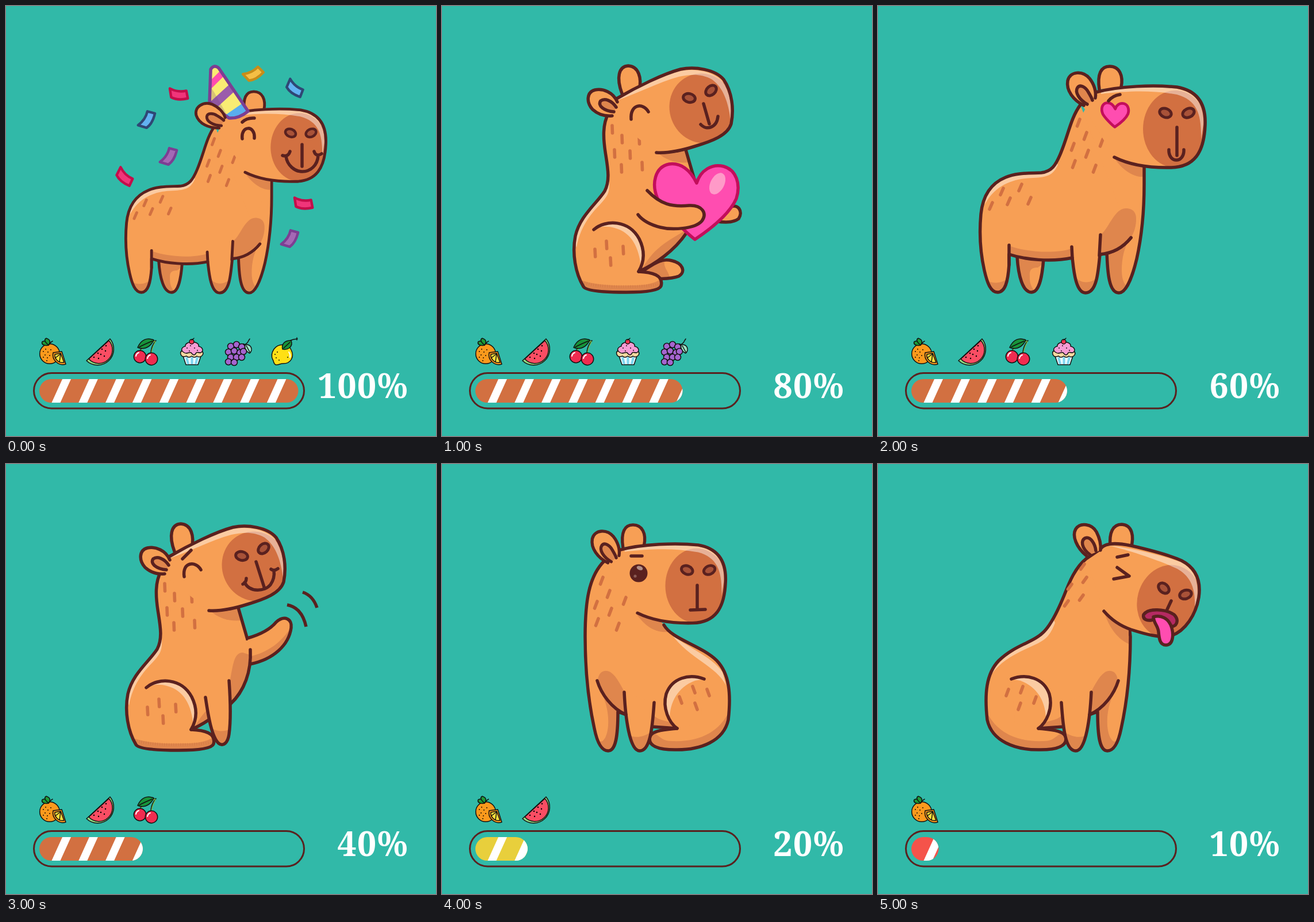
Animation, 748 px wide and 748 px high, one loop 6 s. Source, as an HTML page:

```html
<!DOCTYPE html>
<html lang="en">
<head>
<meta charset="utf-8">
<title>Capybara battery</title>
<style>
  html, body { margin: 0; width: 100%; height: 100%; overflow: hidden; background: #31b9a8; }
  svg { display: block; width: 100vw; height: 100vh; }
  .ln { fill: none; stroke: #5a211f; stroke-width: 5.5; stroke-linecap: round; stroke-linejoin: round; }
  .fur { fill: none; stroke: #d27041; stroke-width: 5.6; stroke-linecap: round; }
  .shade { fill: #df864d; }
  .shine { fill: #fff; opacity: .45; }
  .fruit { stroke: #111; stroke-width: 1.5; stroke-linecap: round; stroke-linejoin: round; }
  text { font: 600 59px "Noto Serif", serif; letter-spacing: 1.5px; fill: #fff; text-anchor: end; }
</style>
</head>
<body>
<svg id="stage" viewBox="0 0 748 748" xmlns="http://www.w3.org/2000/svg"></svg>
<script>
const BODY = '#f79f55', SHADE = '#df864d', MUZZLE = '#d27041', DARK = '#5a211f';
const PINK = '#ff4db0', ROSE = '#c30e5b';
let clips = 0;

const path = (d, attrs) => `<path d="${d}" ${attrs}/>`;
const line = d => path(d, 'class="ln"');
const shade = d => path(d, 'class="shade"');
const shine = d => path(d, 'class="shine"');
const move = (x, y, s, inner) => `<g transform="translate(${x} ${y}) scale(${s})">${inner}</g>`;
const oval = (x, y, rx, ry, turn, attrs) =>
  `<ellipse rx="${rx}" ry="${ry}" transform="translate(${x} ${y}) rotate(${turn})" ${attrs}/>`;
const dot = (x, y, r, attrs = '') => `<circle cx="${x}" cy="${y}" r="${r}" ${attrs}/>`;

// Filled shape with its details clipped inside and its outline on top.
function part(d, inner = '', fill = BODY, edge = DARK) {
  const id = 'c' + clips++;
  return `<clipPath id="${id}">${path(d, '')}</clipPath>` + path(d, `fill="${fill}"`) +
    `<g clip-path="url(#${id})">${inner}</g>` + path(d, `class="ln" style="stroke:${edge}"`);
}
const fur = (spots, dx, dy) => path(spots.map(([x, y]) => `M${x},${y}l${dx},${dy}`).join(''), 'class="fur"');
const nostril = (x, y, turn) =>
  oval(x, y, 10.5, 7.5, turn, `fill="#a85238" stroke="${DARK}" stroke-width="5"`);
const muzzle = (x, y, rx, ry, turn = 0) => oval(x, y, rx, ry, turn, `fill="${MUZZLE}"`);
const ear = (outer, inner) => part(outer) + path(inner, `fill="${SHADE}"`) + line(inner);

const neckFur = fur([[351,197],[363,220],[341,239],[391,232],[366,251],[343,269],[379,277]], -4.5, 12);

// Level head, shared by the standing and the calm seated pose; a hat pushes the ears apart.
const levelHead = ({ hat = '', tilt = 0, spread = 0 } = {}) =>
  move(spread, 0, 1, part('M385,145C381,118 388,105 403,105C420,105 427,121 423,141')) +
  part('M354,170L379,150C420,139 480,137 520,141C555,147 571,170 569,208C567,255 550,280 510,281C470,282 435,275 411,263',
    muzzle(517, 214, 56, 67) +
    shine('M388,149C440,140 490,139 520,144C550,149 568,170 566,206L562,232C563,190 556,164 520,154C480,147 440,147 388,153Z')) +
  hat + `<g transform="rotate(${tilt} 366 170)">` +
  ear('M358,173C340,164 327,147 330,130C334,113 356,112 368,126C376,136 380,149 378,160',
    'M364,171C350,163 342,150 347,142C352,135 362,142 366,150C369,155 372,160 373,164') + '</g>' +
  nostril(500, 186, 22) + nostril(540, 186, -25);

const standing = head =>
  path('M360,180L461,278V330L452,404L386,432L300,300Z', `fill="${BODY}"`) +
  part('M242,436C244,470 252,498 267,498C282,498 286,465 288,440',
    shade('M240,430H290V446L278,455C262,455 264,464 264,474C264,486 270,492 274,500H240Z')) +
  part('M398,425C399,465 402,499 419,499C433,499 444,465 450,440C460,395 463,350 463,310V276',
    shade('M396,420L440,402C428,418 424,440 424,460C424,478 430,488 438,492L420,502H396Z') +
    shade('M410,263C425,286 445,298 465,297V270Z')) +
  part('M352,172C335,195 331,225 317,258C309,277 302,288 284,290C262,291 240,290 222,298C195,309 182,332 179,362C176,395 177,425 185,460C190,482 196,498 208,498C221,498 226,480 228,450V432C255,441 300,446 338,438C340,455 343,499 361,499C380,499 383,465 386,432C410,430 428,418 440,403',
    shade('M228,417C260,429 310,431 337,422V446H228Z') +
    shade('M180,470C195,486 215,484 228,472V502H180Z') +
    shade('M338,466C352,486 372,484 386,468V502H338Z') +
    shine('M186,345C190,318 210,297 245,293L296,289C302,286 307,280 310,273L313,276C305,294 295,298 270,299C232,300 203,313 186,345Z')) +
  shade('M387,397C400,392 410,352 431,352C446,352 450,362 449,374C448,388 444,396 440,403C425,420 405,430 386,432Z') +
  shade('M410,263C425,286 445,298 460,297V278Z') +
  line('M228,416V450M337,419L338,438M386,432C410,430 428,418 440,403M385,434L387,398') +
  fur([[218,317],[250,310],[199,342],[230,334],[266,333]], -5, 11.5) + neckFur + levelHead(head);

// Upright seat with raised snout.
const upright = (behind, front) => behind +
  part('M313,152C303,125 307,105 324,104C342,105 348,125 343,147') +
  part('M290,186C279,205 280,230 285,260C289,285 292,305 283,322C268,345 240,365 232,400C226,430 232,465 246,488C250,496 285,498 320,498C355,498 378,495 381,487C386,468 365,463 342,462C370,450 405,425 425,395C440,370 448,340 440,305L424,250',
    shade('M346,462C366,422 390,410 428,388V410L360,462Z') +
    shade('M373,253C390,270 410,274 430,272L424,250Z') +
    shade('M235,474C260,486 300,487 330,486C350,486 374,484 386,470V500H240Z') +
    path('M240,480C270,490 340,490 382,484', 'fill="none" stroke="#c9713f" stroke-width="5" stroke-dasharray="1 3" opacity=".5"') +
    shine('M230,410C232,370 270,350 285,318L291,305C292,325 288,330 276,344C258,362 240,385 234,420Z') +
    shine('M264,388C285,370 325,372 343,405C350,420 351,440 346,455C343,420 330,394 300,386C286,382 274,384 264,388Z')) +
  line('M264,389C285,371 325,372 343,405C353,425 352,445 342,462') +
  fur([[296,208],[313,225],[343,227],[300,250],[327,252],[312,276],[348,272]], .5, 13) +
  fur([[286,409],[266,423],[315,418],[293,438]], .7, 13) +
  part('M288,188L304,161C340,140 385,118 415,110C440,105 475,110 490,128C505,150 508,180 503,205C497,225 470,235 440,244C415,252 390,256 373,255',
    muzzle(453, 178, 57, 61, -20) +
    shine('M305,162C340,142 385,121 415,113C440,108 470,113 487,130C500,148 505,172 502,198C498,168 490,143 470,128C450,117 432,119 412,123C376,133 342,151 305,164Z')) +
  ear('M305,167C298,150 280,143 266,146C251,150 251,168 262,180C272,189 285,192 296,191',
    'M303,176C295,164 283,160 276,165C270,173 282,183 299,184') +
  nostril(430, 160, 12) + nostril(468, 147, -42) + front;

// Low seat facing left; start and end shape the neck.
const lowSeat = (start, end, back) =>
  part(`${start}C249,360 254,410 265,460C270,485 278,499 289,499C302,499 306,475 306,431L320,436L366,457L409,460C390,462 361,463 361,478C361,492 380,497 405,497C450,498 490,482 498,445C503,400 500,365 478,342${end}`,
    shade('M271,380C270,365 280,355 293,362C305,370 312,388 318,397L322,438C295,425 280,405 271,380Z') +
    shade('M276,395C292,425 292,460 284,476C278,484 280,484 268,480L290,504L308,480V428Z') +
    shade('M369,438C380,448 392,445 400,452L409,461H360Z') +
    shade('M360,470C378,464 375,482 400,482C450,484 485,465 502,425V504H360Z') + back +
    path('M456,374C430,364 400,372 390,400C383,425 395,450 409,460L450,450Z', `fill="${BODY}"`) +
    shine('M456,374C430,364 400,372 390,400C387,418 390,432 396,444C396,415 410,388 440,377Z')) +
  part('M317,397C319,440 326,499 344,499C362,499 366,460 369,415', shade('M320,470C335,478 352,476 366,464V502H320Z')) +
  line('M270,377C277,400 295,425 320,436M456,374C430,364 400,372 390,400C383,425 395,450 409,460') +
  fur([[436,387],[413,405],[461,392],[440,416]], 4, 11);

const heart = 'M440,406C425,395 385,355 375,335C364,310 370,280 395,275C415,272 432,285 443,308C450,285 470,274 490,279C512,285 520,310 512,335C500,362 470,386 440,406Z';

const hat = part('M356,110Q362,101 370,108L421,183Q405,196 388,195Q366,180 354,166Z',
  [[PINK, 'M350,143L384,109', 11], ['#9b5cab', 'M352,180L400,136', 15], ['#5aaeee', 'M376,204L428,168', 17]]
    .map(([c, d, w]) => path(d, `stroke="${c}" stroke-width="${w}"`)).join('') +
  path('M352,135L362,150L388,196L350,172Z', 'fill="#704480" opacity=".25"'), '#f9ec73', '#7c3e93');

const confetti = [
  [300,153,6,'#f0357a','#c30e4b'], [245,198,-58,'#62b2f2','#2f4775'], [283,262,-58,'#a468b5','#7c3e93'],
  [206,297,42,'#f0357a','#c30e4b'], [430,118,-28,'#f5bf45','#c78d19'], [502,143,38,'#62b2f2','#2f4775'],
  [517,343,6,'#f0357a','#c30e4b'], [494,405,-58,'#a468b5','#7c3e93']
].map(([x, y, turn, fill, edge]) => path('M-16,-8Q-1,-2 13,-7L17,6Q0,12 -12,7Z',
  `transform="translate(${x} ${y}) rotate(${turn})" fill="${fill}" stroke="${edge}" stroke-width="4.4" stroke-linejoin="round"`)).join('');

const partyHead = { hat: move(-56.8, -62.4, 1.125, hat), tilt: -28, spread: 25 };
const party = confetti + move(50.5, 55.5, .889, standing(partyHead)) +
  line('M411,231C408,207 434,207 432,230M411,202Q419,194 432,195M515,241V279M487,261C489,278 503,288 515,288C530,288 542,277 543,260M481,260Q491,263 494,253M536,253Q539,263 549,257');

const hug = upright(
  part('M345,464C375,443 385,439 400,443C418,447 425,462 412,470C400,475 385,474 370,475',
    shade('M345,440H388C382,456 398,462 396,478H345Z')),
  part('M500,350C516,343 524,358 516,370C505,378 490,377 476,374') +
  part(heart, oval(479, 309, 12, 20, 27, 'fill="#ff9ac8"'), PINK, ROSE) +
  part('M357,321C380,345 400,350 430,347C452,346 462,360 452,374C440,388 400,390 380,385C360,380 348,372 341,363') +
  line('M329,197C327,170 350,168 359,184M455,170L465,205M450,206C460,217 478,212 480,192'));

const love = standing() +
  move(271, 80.5, .32, path(heart, `fill="${PINK}" stroke="${ROSE}" stroke-width="15" stroke-linejoin="round"`)) +
  line('M401,165Q408,156 421,154M520,211V260M506,250C505,274 533,274 532,250');

const wave = move(-20, 0, 1, upright('', '')) +
  path('M412,307H428V347L410,345Z', `fill="${BODY}"`) +
  part('M420,303C445,296 460,287 470,275C485,262 498,270 496,285C492,315 465,340 425,348',
    shade('M424,335C455,328 480,310 497,282V350H420Z')) +
  shade('M389,380C395,350 396,328 412,328L424,332C426,360 410,395 390,414Z') +
  line('M425,323C427,360 415,395 390,418') +
  part('M347,406C352,440 358,475 370,486C378,492 386,485 388,470C392,440 390,405 388,377',
    shade('M354,457C365,466 380,467 392,460V492H354Z')) +
  line('M307,165L322,150M310,196C306,170 330,168 339,184M435,170L449,214M415,206C424,224 450,222 460,210C467,200 467,192 466,185M412,209Q418,206 418,199M461,183Q466,187 473,182') +
  path('M489,245Q515,250 522,283M516,223Q534,229 541,250', 'class="ln" style="stroke-linecap:butt"');

const calm = lowSeat('M283,168C255,195 249,240 249,300', 'C450,315 400,305 386,280',
    shade('M339,262C355,284 372,294 394,292L384,274Z') +
    shine('M400,297C420,315 470,335 488,362L494,385C478,352 430,338 400,297Z')) +
  move(-71, 0, 1, neckFur) + move(-58.7, 4.1, .97, levelHead()) +
  dot(342, 190, 15.5, `fill="${DARK}"`) + oval(344, 181, 5.5, 3.5, 20, 'fill="#b08e88"') + dot(336, 195, 2.6, 'fill="#8b5b55"') +
  line('M329,160H348M444,211V253M432,254L458,253');

const yuck = '<g transform="translate(688) scale(-1 1)">' +
  lowSeat('M251,282L249,300', 'C450,315 418,310 403,295C388,283 375,255 364,228C355,205 345,180 326,165',
    shine('M490,365C470,325 425,315 402,297C393,290 388,280 383,270L380,276C388,298 397,306 412,313C445,328 472,340 490,365Z')) + '</g>' +
  shade('M393,256C402,286 418,305 436,313V284Z') +
  fur([[359,174],[363,197],[337,209],[357,228],[331,238]], -6.5, 9) +
  part('M404,143C402,120 408,105 424,105C442,106 446,125 440,147') +
  part('M362,165L387,148C395,135 420,138 440,142C475,150 510,160 528,168C555,182 562,205 558,232C553,262 535,290 510,299C490,303 465,296 440,288C420,281 405,270 393,256',
    muzzle(506, 239, 55, 64, 15) +
    shine('M402,142C440,145 500,161 525,170C550,181 559,205 555,236L551,250C553,214 542,194 520,182C490,168 440,151 402,142Z')) +
  ear('M363,160C345,145 337,125 344,113C352,101 372,104 380,118C387,132 388,142 387,150',
    'M369,158C353,146 353,133 360,129C370,125 378,140 379,151') +
  nostril(497, 216, 42) + nostril(535, 227, -18) +
  part('M462,262C470,250 500,252 515,262C525,272 519,285 508,282C500,270 488,268 478,271C468,274 460,270 462,262Z', '', '#b52a62') +
  part('M479,266C492,262 506,268 511,285C515,300 512,315 501,315C490,315 489,303 488,292C487,281 480,278 479,266Z', '', PINK) +
  line('M510,238L503,253M416,180L437,195L410,200M416,162L435,158');

const f = (d, fill) => path(d, `class="fruit" fill="${fill}"`);
const ball = (x, y, r, fill) => dot(x, y, r, `class="fruit" fill="${fill}"`);
const specks = (spots, r = .9) => spots.map(([x, y]) => dot(x, y, r)).join('');
const glint = d => path(d, 'fill="none" stroke="#fff" stroke-width="2" stroke-linecap="round"');

const fruits = [
  ball(76, 605, 17.3, '#fb991c') + specks([[65,601],[69,597],[73,602],[68,607],[65,611],[72,612],[78,598],[76,608],[71,617]]) +
    f('M74,590C66,592 61,588 63,584C69,581 74,584 74,590Z', '#1d9a36') + f('M74,590C67,584 66,580 70,578C77,580 78,585 74,590Z', '#1d9a36') +
    f('M75,589Q77,585 81,583', 'none') +
    f('M97,601L104,623C91,627 79,615 82,603Z', '#fb991c') + f('M95,604L101,620C92,622 84,614 85,606Z', '#ffdf3b') + f('M95,605L86,612M95,605L93,619', 'none'),
  f('M181,579A28,28 0 0 1 140,617Z', '#91d980') + f('M179,582A23,23 0 0 1 144,614Z', '#fa4d63') +
    specks([[174,591],[167,597],[160,604],[153,611],[173,600],[165,606],[161,613],[171,609]], 1.2),
  f('M233,600Q240,586 261,582M252,603Q253,590 261,582', 'none') +
    path('M234,600Q241,588 260,583M253,603Q255,592 260,584', 'fill="none" stroke="#7db53c" stroke-width="1.4"') +
    f('M257,581C249,598 236,597 229,594C235,580 246,576 257,581Z', '#17933a') + f('M232,593Q244,587 254,583', 'none') +
    ball(233, 610, 10.7, '#f12c50') + ball(253, 614, 10.7, '#f12c50') + glint('M226,609Q227,604 231,603M246,613Q247,608 251,607'),
  f('M307,606L313,624H334L340,606Z', '#e9fbff') +
    path('M314,611L317,623M323.500,611V623M333,611L330,623', 'stroke="#7ed5ef" stroke-width="4"') +
    f('M304,606C302,600 308,598 312,600H336C343,599 345,605 340,609Q336,612 332,609Q328,613 323,609Q318,613 314,609Q306,612 304,606Z', '#f8d9a0') +
    f('M307,601C303,596 309,592 312,592C311,587 319,584 324,585C331,584 336,588 335,592C341,593 345,599 339,603C335,604 334,601 331,603C328,610 324,606 322,603C317,602 314,606 310,603Z', '#f79bd4') +
    ball(323, 584, 4, '#ef3450') + f('M323,581L327,578', 'none') +
    specks([[315,595],[321,591],[328,595],[333,599],[319,600]]),
  f('M408,591Q412,586 415,589Q420,587 422,582L424,579', 'none') +
    f('M416,589C427,588 430,598 424,604C417,601 414,595 416,589ZM418,591L424,602', '#9be0c2') +
    [[391,592],[401,589],[410,593],[387,602],[397,600],[407,603],[413,601],[391,611],[401,611],[410,611],[387,619],[397,620]]
      .map(([x, y]) => ball(x, y, 5.5, '#a565cf')).join(''),
  f('M466,597C474,586 491,587 496,598C502,610 496,622 482,622C476,622 474,625 469,624C465,622 466,618 464,615C461,609 462,603 466,597Z', '#ffe015') +
    f('M483,592C488,584 496,581 500,580L507,579M506,577V581', 'none') + f('M496,582C500,592 491,599 481,597C479,588 485,581 496,582Z', '#17933a') +
    f('M483,595L494,585', 'none') + specks([[468,606],[472,602],[470,612],[475,616],[490,611]]) + glint('M492,602Q495,606 494,611')
];

// One pose per second.
const states = [
  { art: party, pct: 100, end: 508.5, fill: MUZZLE },
  { art: hug, pct: 80, end: 418.5, fill: MUZZLE },
  { art: love, pct: 60, end: 329, fill: MUZZLE },
  { art: wave, pct: 40, end: 238, fill: MUZZLE },
  { art: calm, pct: 20, end: 149, fill: '#e8cf3c' },
  { art: yuck, pct: 10, end: 105.5, fill: '#f5534a' }
];

let stripes = '';
for (let i = 0; i < 9; i++) stripes += `M${98.5 + i * 46.8},648h15l-19.500,43h-15Z`;

const stage = document.getElementById('stage');
stage.innerHTML = '<rect width="748" height="748" fill="#31b9a8"/>' +
  states.map(s => `<g class="pose">${s.art}</g>`).join('') +
  fruits.map(s => `<g class="snack">${s}</g>`).join('') +
  `<rect x="48.500" y="638.500" width="470" height="61.500" rx="30.700" fill="none" stroke="${DARK}" stroke-width="3"/>` +
  '<clipPath id="level"><rect id="cut" x="58" y="649" height="41" rx="20.500"/></clipPath>' +
  `<g clip-path="url(#level)"><rect id="fill" x="58" y="649" width="452" height="41"/>${path(stripes, 'fill="#fff"')}</g>` +
  '<text id="pct" x="700.500" y="682"></text>';

const poses = stage.querySelectorAll('.pose'), snacks = stage.querySelectorAll('.snack');
const cut = document.getElementById('cut'), bar = document.getElementById('fill'), pct = document.getElementById('pct');
let shown = -1;

function draw(ms) {
  const n = Math.floor(ms / 1000) % states.length;
  if (n === shown) return;
  shown = n;
  const s = states[n];
  poses.forEach((g, i) => g.style.display = i === n ? '' : 'none');
  snacks.forEach((g, i) => g.style.display = i < states.length - n ? '' : 'none');
  cut.setAttribute('width', s.end - 58);
  bar.setAttribute('fill', s.fill);
  pct.textContent = s.pct + '%';
}

const began = performance.now();
function tick() {
  draw(performance.now() - began);
  requestAnimationFrame(tick);
}
tick();
</script>
</body>
</html>
```
